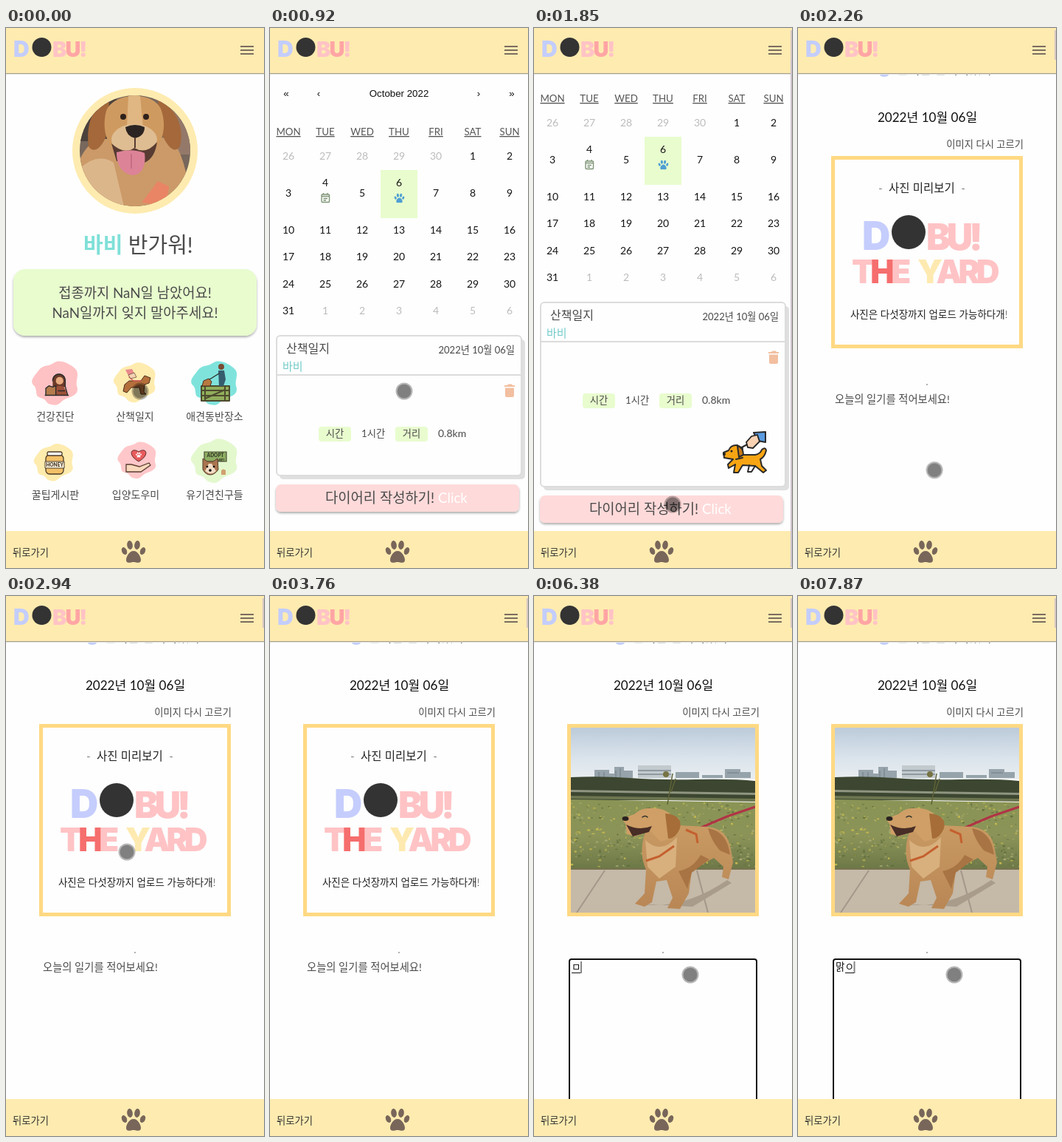
Recreate the animation shown at these times as an HTML page. Size 350 px wide and 730 px high, loop 8000 ms.

```html
<!DOCTYPE html>
<html lang="ko">
<head>
<meta charset="utf-8">
<title>산책일지</title>
<style>
html, body { margin: 0; width: 100%; height: 100%; overflow: hidden; background: #fefefe; }
svg { display: block; width: 100vw; height: 100vh; }
text { font-family: Lato, 'Noto Sans CJK KR', 'Noto Sans CJK', sans-serif; fill: #4a4a4a; font-size: 14px; }
.mid { text-anchor: middle; }
.end { text-anchor: end; }
.logo { font-family: Inter, sans-serif; font-weight: 900; }
.nav { font-family: 'Liberation Sans', Arial, sans-serif; font-size: 13.3px; fill: #111; }
.day { fill: #151515; }
.off { fill: #bcbcbc; }
.week { font-size: 13.3px; fill: #555; text-decoration: underline dotted; }
.small { font-size: 13.3px; }
.line { fill: none; stroke: #2b2b2b; stroke-width: 2; stroke-linecap: round; stroke-linejoin: round; }

/* Every animation shares one 8 s clock */
.t { animation: 8s step-end infinite; }
.home { animation-name: home; }
.cal { animation-name: cal; }
.diary { animation-name: diary; }
.preview { animation-name: preview; }
.photo { animation-name: photo; }
.area { animation-name: area; }
.hint { animation-name: hint; }
.k1 { animation-name: k1; }
.k2 { animation-name: k2; }
.k3 { animation-name: k3; }
.k4 { animation-name: k4; }
.k5 { animation-name: k5; }
.caret { animation-name: caret; }
.loaded { animation-name: loaded; }
.tall { animation-name: tall; }
.push { animation-name: push; }
.hide { animation-name: hide; }
.scroll { animation: scroll 8s linear infinite; }
.thumb { animation: thumb 8s linear infinite; }
.touch { animation: touch 8s linear infinite; }

@keyframes home { 0% { opacity: 1 } 10.6%, 100% { opacity: 0 } }
@keyframes cal { 0% { opacity: 0 } 10.6% { opacity: 1 } 25.7%, 100% { opacity: 0 } }
@keyframes diary { 0% { opacity: 0 } 25.7%, 100% { opacity: 1 } }
@keyframes preview { 0% { opacity: 1 } 66.2%, 100% { opacity: 0 } }
@keyframes photo { 0% { opacity: 0 } 66.2%, 100% { opacity: 1 } }
@keyframes area { 0% { opacity: 0 } 73.85%, 100% { opacity: 1 } }
@keyframes hint { 0% { opacity: 1 } 79.7%, 100% { opacity: 0 } }
@keyframes k1 { 0% { opacity: 0 } 79.7% { opacity: 1 } 86.3%, 100% { opacity: 0 } }
@keyframes k2 { 0% { opacity: 0 } 86.3% { opacity: 1 } 87.9%, 100% { opacity: 0 } }
@keyframes k3 { 0% { opacity: 0 } 87.9% { opacity: 1 } 94.2%, 100% { opacity: 0 } }
@keyframes k4 { 0% { opacity: 0 } 94.2% { opacity: 1 } 98.3%, 100% { opacity: 0 } }
@keyframes k5 { 0% { opacity: 0 } 98.3%, 100% { opacity: 1 } }
@keyframes caret {
  0% { transform: translateX(0) }
  79.7% { transform: translateX(13px) }
  98.3%, 100% { transform: translateX(25.5px) }
}
@keyframes loaded { 0% { opacity: 0 } 14%, 100% { opacity: 1 } }
@keyframes tall { 0% { height: 189px } 14%, 100% { height: 249px } }
@keyframes push { 0% { transform: none } 14%, 100% { transform: translateY(60px) } }
@keyframes scroll {
  0%, 16% { transform: none; animation-timing-function: ease-in-out }
  22%, 100% { transform: translateY(-45px) }
}
@keyframes thumb {
  0%, 13.9% { opacity: 0; transform: none }
  14%, 16% { opacity: 1; transform: none; animation-timing-function: ease-in-out }
  22%, 25% { opacity: 1; transform: translateY(39px) }
  28%, 100% { opacity: 0; transform: translateY(39px) }
}
@keyframes touch {
  0%, 14% { transform: translate(182px, 491px); animation-timing-function: ease-in-out }
  22.5%, 25.5% { transform: translate(188px, 644px); animation-timing-function: ease-in-out }
  34.25% { transform: translate(174px, 421px); animation-timing-function: ease-out }
  36.5%, 37.5% { transform: translate(164px, 346px) }
  40.8%, 44.4% { transform: translate(175.5px, 344.5px) }
  46.2%, 66.1% { transform: translate(71px, 338px) }
  66.2%, 66.6% { transform: translate(108px, 502px) }
  68.8% { transform: translate(152px, 549px) }
  71.3%, 100% { transform: translate(212px, 512px) }
}
@keyframes hide { 0% { opacity: 1 } 46.4% { opacity: 0 } 66.2%, 100% { opacity: 1 } }
</style>
</head>
<body>
<svg viewBox="0 0 350 730" preserveAspectRatio="none">
<defs>
  <path id="blob" d="M-22-17C-16-25-9-22-2-27S17-27 25-20 25-5 28 4 22 16 14 19 6 29-4 27-10 20-19 18-22 8-28 2-27-10-22-17Z"/>
  <g id="paw">
    <path d="M0-1C6-1 10 7 10 11 10 17 4 14 0 14S-10 17-10 11C-10 7-6-1 0-1Z"/>
    <ellipse cx="-5" cy="-9" rx="3.8" ry="6" transform="rotate(-8 -5 -9)"/>
    <ellipse cx="5" cy="-9" rx="3.8" ry="6" transform="rotate(8 5 -9)"/>
    <ellipse cx="-12.5" cy="-1" rx="3.4" ry="5.2" transform="rotate(-24 -12.5 -1)"/>
    <ellipse cx="12.5" cy="-1" rx="3.4" ry="5.2" transform="rotate(24 12.5 -1)"/>
  </g>
  <clipPath id="round"><circle cx="175" cy="166" r="75"/></clipPath>
  <clipPath id="square"><path d="M50 178h250v250H50z"/></clipPath>
  <linearGradient id="sky" x2="0" y2="1"><stop stop-color="#bccbda"/><stop offset=".6" stop-color="#dbe4ec"/><stop offset="1" stop-color="#e9eef0"/></linearGradient>
  <linearGradient id="grass" x2="0" y2="1"><stop stop-color="#8a9455"/><stop offset=".5" stop-color="#8b9358"/><stop offset="1" stop-color="#697546"/></linearGradient>
  <linearGradient id="coat" x2="0" y2="1"><stop stop-color="#c99a63"/><stop offset="1" stop-color="#b98755"/></linearGradient>
  <filter id="drop" x="-10%" y="-20%" width="120%" height="150%"><feDropShadow dx="0" dy="2" stdDeviation="1.5" flood-opacity=".32"/></filter>
</defs>
<rect width="350" height="730" fill="#fefefe"/>

<g class="t home">
  <circle cx="175" cy="166" r="85" fill="#feebb0"/>
  <g clip-path="url(#round)">
    <path d="M100 91h150v150H100z" fill="#77675c"/>
    <path d="M100 91h50v62h-50z" fill="#4b423d"/>
    <path d="M222 91h28v80h-28z" fill="#94796a"/>
    <path d="M100 241V178Q112 152 130 150L222 148Q246 172 250 241Z" fill="#cb9a68"/>
    <path d="M100 190Q124 168 146 182L160 241H100Z" fill="#dcb68b"/>
    <path d="M140 98C118 104 108 130 112 160 120 172 132 160 138 140Z" fill="#a4683a"/>
    <path d="M206 98C232 108 242 136 236 160 226 174 214 152 208 134Z" fill="#a4683a"/>
    <path d="M136 112C146 86 202 84 211 112 220 140 210 172 174 176 140 174 128 142 136 112Z" fill="#cf9a60"/>
    <path d="M166 92q8-4 16 0l4 42h-22z" fill="#e0b682"/>
    <ellipse cx="174" cy="151" rx="31" ry="21" fill="#dfbd92"/>
    <path d="M143 156Q160 172 174 162 190 172 205 154 202 176 188 182L150 180Z" fill="#583b32"/>
    <path d="M150 168Q170 162 188 169C190 184 186 198 172 199 156 197 150 184 150 168Z" fill="#dd8398"/>
    <path d="M170 170v20" stroke="#c66e86" stroke-width="2"/>
    <path d="M162 134Q175 128 188 134 188 146 175 149 163 146 162 134Z" fill="#2b2422"/>
    <path d="M175 148v14" stroke="#583b32" stroke-width="2"/>
    <circle cx="159" cy="120" r="4" fill="#2e211b"/><circle cx="190" cy="120" r="4" fill="#2e211b"/>
    <path d="M184 236L206 207 221 214 217 241Z" fill="#e98564"/>
  </g>
  <text x="105" y="304" style="font-size:29px"><tspan fill="#7fe0d8" font-weight="700">바비</tspan> 반가워!</text>
  <rect x="10" y="326" width="330" height="90" rx="16" fill="#e8fcce" filter="url(#drop)"/>
  <text class="mid" x="175" y="364.5" style="font-size:18.8px">접종까지 NaN일 남았어요!</text>
  <text class="mid" x="175" y="391.5" style="font-size:18.8px">NaN일까지 잊지 말아주세요!</text>

  <g transform="translate(67 481)">
    <use href="#blob" fill="#ffc2c4" transform="scale(1.05)"/>
    <g transform="translate(4 1) scale(.85)">
      <path d="M-9 6V-8C-9-20 11-20 11-8V4Z" fill="#6b3b29"/>
      <circle cx="2" cy="-6" r="6" fill="#e9ac80"/>
      <path d="M-8 17Q-8 2 2 2T14 17Z" fill="#9c5138"/>
      <path d="M-20 17V6L-15 2-9 4-4 2V17Z" fill="#b47b4c"/>
      <path class="line" d="M-21 17H16M-20 17V6L-15 2-9 4-4 2V17M-9-6C-9-20 11-20 11-6V3L15 17M0 10H10" style="stroke-width:1.6"/>
    </g>
  </g>
  <g transform="translate(175 480)">
    <use href="#blob" fill="#feebae" transform="scale(.96)"/>
    <path d="M-14 2L-8-3 8-3 13-10 21-7 19 0 13 2 12 12 15 15H8L6 6H-5L-11 13-16 11Z" fill="#b46f3b" stroke="#4b2d1b"/>
    <path d="M-8-8L-2-3 8-3" class="line" style="stroke:#d85c5c;stroke-width:1.5"/>
    <path d="M-13-18l9-1 3 6-8 3z" fill="#e9898c"/>
    <path d="M-9-11l8-3 3 6-8 2z" fill="#f5d2b4" stroke="#71503b" stroke-width=".8"/>
  </g>
  <g transform="translate(283 481)">
    <use href="#blob" fill="#7fe3dc" transform="scale(1.05)"/>
    <path d="M-18 22V3H20V22Z" fill="#91ae5b"/>
    <path class="line" d="M-18 23V3H20V23ZM-18 9H20M-18 16H20M-13 23V4M14 23V4M-13 20L14 8" style="stroke:#4e4b2f"/>
    <circle cx="9" cy="-23" r="4" fill="#7a4a33"/>
    <path d="M5-18H13L15-6 12 3H6Z" fill="#355d6d"/>
    <path class="line" d="M6-14L-2-9-10-4" style="stroke-width:1.3"/>
    <path d="M-17 3L-15-4-8-7-4-3-6 3Z" fill="#b87840" stroke="#49301f"/>
  </g>
  <g transform="translate(65 588)">
    <use href="#blob" fill="#feebae" transform="scale(.9)"/>
    <rect x="-11" y="-11" width="24" height="26" rx="5" fill="#f3c067" stroke="#4b3a29" stroke-width="1.3"/>
    <rect x="-9" y="-15" width="20" height="5" rx="2" fill="#fff" stroke="#4b3a29" stroke-width="1.3"/>
    <path d="M-12-2H14V7H-12Z" fill="#fff8e4" stroke="#4b3a29"/>
    <text class="mid" x="1" y="5" style="font-size:6.5px;font-weight:900;fill:#4b3a29">HONEY</text>
  </g>
  <g transform="translate(178 585)">
    <use href="#blob" fill="#ffc7c9" transform="scale(.88)"/>
    <path d="M2 1C-14-8-8-19 2-12 12-19 18-8 2 1Z" fill="#e95a5c" stroke="#5b2d2d"/>
    <use href="#paw" transform="translate(2 -8) scale(.24)" fill="#fff"/>
    <path d="M-15 5H-8L3 8 16 3 18 6 5 15H-15Z" fill="#f8d9be" stroke="#5b3d30" stroke-width="1.3"/>
  </g>
  <g transform="translate(283 586)">
    <use href="#blob" fill="#e4f8ce" transform="scale(1.06)"/>
    <path d="M-14-13H16V0H-14Z" fill="#8eae63" stroke="#4a4b37" stroke-width="1.2"/>
    <text class="mid" x="1" y="-6" style="font-size:6.5px;font-weight:900;fill:#3b3f2b">ADOPT</text>
    <text class="mid" x="8" y="-.5" style="font-size:6px;font-weight:900;fill:#3b3f2b">ME!</text>
    <path d="M-16-4L-10 0H-2L4-4 5 11Q0 18-6 18T-16 11Z" fill="#a9744f" stroke="#57402f"/>
    <path d="M-8 3H-4L2 13Q-5 20-13 13Z" fill="#f1dcc5"/>
    <circle cx="-10" cy="7" r="1.3"/><circle cx="-1" cy="7" r="1.3"/><circle cx="-6" cy="12" r="1.8"/>
    <path d="M9 18V12Q12 9 15 12V18Z" fill="#d1a06f"/>
  </g>
  <g class="mid">
    <text x="67" y="530">건강진단</text><text x="175" y="530">산책일지</text><text x="283" y="530">애견동반장소</text>
    <text x="67" y="636">꿀팁게시판</text><text x="176" y="636">입양도우미</text><text x="283" y="636">유기견친구들</text>
  </g>
</g>

<g class="t cal"><g class="scroll">
  <text class="nav mid" x="175" y="93">October 2022</text>
  <g class="mid"><text class="nav" x="22" y="93">«</text><text class="nav" x="66" y="93">‹</text><text class="nav" x="283" y="93">›</text><text class="nav" x="328" y="93">»</text></g>
  <rect x="150" y="192" width="50" height="65" fill="#e8fcce"/>
  <g id="days" class="mid"></g>
  <g fill="none" stroke="#7e9576" stroke-width="1.4"><rect x="70" y="225" width="10.5" height="10.5" rx="1"/><path d="M70 227.5h10.5M72.5 223v2M78 223v2M72.5 230.5h5.5M72.5 233h3.5"/></g>
  <use href="#paw" transform="translate(175.5 230) scale(.42)" fill="#4f9fd3"/>

  <rect class="t tall" x="13" y="421" width="333" height="189" rx="5" fill="#dfdfdf"/>
  <rect class="t tall" x="9" y="416" width="332" height="189" rx="5" fill="#fefefe" stroke="#dcdcdc" stroke-width="2"/>
  <path d="M9 469h332" stroke="#dcdcdc" stroke-width="2"/>
  <text x="22" y="439" style="font-size:16px">산책일지</text>
  <text class="end" x="332" y="440" style="font-size:13.1px">2022년 10월 06일</text>
  <text x="17" y="463" style="font-size:15px;fill:#73cbc9">바비</text>
  <path d="M318 483h4l1-1.5h5l1 1.5h3v2h-14zM319 486.5h12v10.5q0 2-2 2h-8q-2 0-2-2z" fill="#f2bfa0"/>
  <g fill="#e8fcce"><rect x="66" y="539" width="44" height="20" rx="4"/><rect x="170" y="539" width="44" height="20" rx="4"/></g>
  <text class="small mid" x="88" y="553">시간</text><text class="small" x="124" y="553">1시간</text>
  <text class="small mid" x="192" y="553">거리</text><text x="228" y="553">0.8km</text>

  <g class="t loaded" transform="translate(0 45)">
    <path class="line" d="M276 570L293 561"/>
    <path class="line" d="M298 547L314 546V560L304 558Z" style="fill:#5b9be0"/>
    <path d="M303 550L295 552 288 560 290 567 297 568 306 559Z" fill="#f8d2b3" stroke="#222" stroke-width="1.8"/>
    <path class="line" style="fill:#f8a513" d="M257 574L264 571Q267 563 276 564L283 568 282 577H300Q307 576 309 570 314 566 315 571 313 580 307 583L309 592 315 598 311 601 300 592 283 591 277 601H271L273 590 264 595 263 590 270 583 258 581Z"/>
    <path class="line" style="fill:#c97a16" d="M276 565Q284 567 284 577L278 580Z"/>
    <path class="line" d="M300 592L295 600H290L292 591M274 583L283 581"/>
    <circle cx="268" cy="572" r="1.5" fill="#222"/><circle cx="258" cy="576" r="2" fill="#222"/>
  </g>

  <g class="t push">
    <rect x="8" y="617" width="330" height="37" rx="7" fill="#ffdada" filter="url(#drop)"/>
    <text x="75" y="642" style="font-size:18.8px">다이어리 작성하기! <tspan fill="#fff">Click</tspan></text>
  </g>
</g></g>

<g class="t diary">
  <rect x="110" y="50" width="14" height="16" rx="6" fill="#c3cffb"/>
  <text x="134" y="62" style="font-size:17px;fill:#111">즐거운 산책이었나</text>
  <text class="mid" x="175.5" y="127" style="font-size:17.1px;fill:#111">2022년 10월 06일</text>
  <text class="small end" x="306" y="162">이미지 다시 고르기</text>
  <rect x="47.5" y="175.5" width="255" height="255" fill="#fefefe" stroke="#ffd983" stroke-width="5"/>
  <g class="t preview">
    <text class="mid" x="168" y="222" style="font-size:15.5px;fill:#222;font-weight:300">-&#160; 사진 미리보기 &#160;-</text>
    <text class="logo" x="87" y="300" style="font-size:53px;fill:#c5cdfd">D</text>
    <circle cx="150" cy="276" r="23" fill="#333"/>
    <text class="logo" x="174" y="300" style="font-size:49px;fill:#ffc3c5;letter-spacing:-5px">BU!</text>
    <text class="logo" x="73" y="345" style="font-size:44px;fill:#ffc3c5;letter-spacing:-5px">T<tspan fill="#f66e6e">H</tspan>E</text>
    <text class="logo" x="162" y="345" style="font-size:44px;fill:#ffc3c5;letter-spacing:-5px"><tspan fill="#feeab0">Y</tspan>ARD</text>
    <text class="mid" x="177.5" y="392" style="font-size:13.5px;fill:#222;font-weight:300">사진은 다섯장까지 업로드 가능하다개!</text>
  </g>
  <g class="t photo" clip-path="url(#square)">
    <rect x="50" y="178" width="250" height="70" fill="url(#sky)"/>
    <path d="M82 246V235H102V240H109V231H122V236H134V246ZM192 246V238H224V246ZM228 246V242H256V246ZM259 246V234H280V238H294V246Z" fill="#96a3aa"/>
    <path d="M141 246V229H186V246Z" fill="#c2cace"/>
    <path d="M141 236h45M141 241h45M262 239h16M111 236v10M117 233v13M88 238v8M95 238v8" stroke="#7f8b91" stroke-width="1.5"/>
    <path d="M50 245Q90 243 130 246T220 248 300 250V276H50Z" fill="#3c4630"/>
    <path d="M50 262L300 266V269L50 265Z" fill="#8f9580"/>
    <path d="M50 270L300 274V278L50 274Z" fill="#6d7650"/>
    <path d="M50 275L300 279V374H50Z" fill="url(#grass)"/>
    <g id="flowers"></g>
    <path d="M50 370h250v58H50z" fill="#c5b9a8"/>
    <path d="M50 369h250" stroke="#78724f" stroke-width="2"/>
    <path d="M96 371L58 428M221 371L236 428" stroke="#a4988a" stroke-width="2"/>
    <path d="M140 416Q200 426 262 384L268 388 215 420Z" fill="#a99c8b"/>
    <path d="M181 282L188 240M186 265l6-18" stroke="#5f6336" stroke-width="1.5"/><circle cx="179" cy="241" r="4" fill="#777443"/>
    <path d="M300 285L262 298 222 315" fill="none" stroke="#b03445" stroke-width="3"/>
    <path d="M150 322Q164 304 195 310L235 312Q262 314 267 342L270 360 264 383 255 380 257 366 244 354 226 364 214 372 210 402 198 423 181 422 188 408 180 384 166 386 160 414 150 420 137 416 150 402 152 370Q142 348 150 322Z" fill="url(#coat)"/>
    <path d="M236 314Q262 318 266 350L252 344Q240 330 236 314ZM196 372Q216 368 226 350L238 356 214 374 208 396Z" fill="#a87443"/>
    <path d="M151 330Q172 350 194 326L192 366 170 382 154 366Z" fill="#d8b07d"/>
    <path d="M119 301L136 295Q146 285 164 287 186 288 190 306L186 328 172 332 158 318 137 325 126 322 124 308Z" fill="#cf9f67"/>
    <path d="M178 294Q202 296 198 314 192 328 182 328Z" fill="#a66d38"/>
    <path d="M125 309Q142 318 160 311L156 319 134 325Z" fill="#482e26"/>
    <ellipse cx="124" cy="301" rx="4.5" ry="3" fill="#292320"/>
    <path d="M147 299q4-3 7 0" class="line" style="stroke-width:1.5"/>
    <path d="M152 358L170 352 190 338M206 316L220 322 222 334" fill="none" stroke="#c4602f" stroke-width="3"/>
  </g>
  <circle cx="175" cy="482" r="1" fill="#999"/>
  <g class="t area">
    <rect x="48" y="491" width="254" height="230" rx="3" fill="#fefefe" stroke="#111" stroke-width="2"/>
    <path class="t caret" d="M51 494v16" stroke="#111"/>
    <g id="typed"></g>
  </g>
  <text class="t hint" x="50" y="507" style="font-size:14.3px">오늘의 일기를 적어보세요!</text>
</g>

<rect width="350" height="61" fill="#feebb0"/>
<path d="M0 61.5h350" stroke="#a89f8c"/><path d="M0 62.5h350" stroke="#e6e4e0"/>
<text class="logo" x="10" y="39" style="font-size:30px;fill:#c3cdfd">D</text>
<circle cx="48.5" cy="26" r="13" fill="#333"/>
<text class="logo" x="63" y="39" style="font-size:29px;fill:#ffc3c5;letter-spacing:-2px">B<tspan fill="#ffa5a5">U</tspan>!</text>
<path d="M318 25h18M318 30h18M318 35h18" stroke="#7b6d62" stroke-width="2"/>
<rect y="680" width="350" height="50" fill="#feebb0"/>
<text class="small" x="9" y="714" style="fill:#333">뒤로가기</text>
<use href="#paw" x="173" y="708" fill="#78665a"/>
<path class="t loaded" d="M349 3v40" stroke="#d9c9c4" stroke-width="2"/>
<path class="thumb" d="M349 3v687" stroke="#cfc5cd" stroke-width="2"/>
<g class="touch"><g class="t hide"><circle r="11.5" fill-opacity=".28"/><circle r="9.5" fill-opacity=".3"/></g></g>
</svg>
<script>
const NS = 'http://www.w3.org/2000/svg';
function add(parent, tag, attrs, text = '') {
  const el = document.createElementNS(NS, tag);
  for (const key in attrs) el.setAttribute(key, attrs[key]);
  el.textContent = text;
  document.getElementById(parent).append(el);
}

// Calendar: Monday first, starting on 26 September
const colX = col => 25 + col * 50;
['MON', 'TUE', 'WED', 'THU', 'FRI', 'SAT', 'SUN'].forEach((name, col) =>
  add('days', 'text', { x: colX(col), y: 145, class: 'week' }, name));
[173, 223, 273, 309, 346, 382].forEach((y, row) => {
  for (let col = 0; col < 7; col++) {
    const n = row * 7 + col - 4;
    const inside = n > 0 && n < 32;
    const lift = n === 4 || n === 6 ? 14 : 0;
    const label = inside ? n : n < 1 ? n + 30 : n - 31;
    add('days', 'text', { x: colX(col), y: y + 5 - lift, class: inside ? 'day' : 'off' }, label);
  }
});

// Meadow: dark tufts, pale blades and yellow flowers
let seed = 7;
const random = () => (seed = seed * 16807 % 2147483647) / 2147483647;
const tints = ['#5f6d3c', '#a9ac72', '#c9bd4e'];
for (let i = 0; i < 420; i++) {
  add('flowers', 'ellipse', {
    cx: 50 + random() * 250, cy: 280 + random() * 86,
    rx: 0.8 + random() * 1.6, ry: 0.6 + random(),
    fill: tints[i % 3], opacity: 0.4 + random() * 0.5
  });
}

// Syllable being composed
['ㅁ', '마', '말', '맑', '맑ㅇ'].forEach((word, i) => {
  const cls = 't k' + (i + 1);
  const start = i === 4 ? 64 : 51;
  add('typed', 'text', { x: 51, y: 506, class: cls, style: 'font-size:13.5px;fill:#111' }, word);
  add('typed', 'path', { d: `M${start} 509.5h12`, class: cls, stroke: '#111' });
});
</script>
</body>
</html>
```
